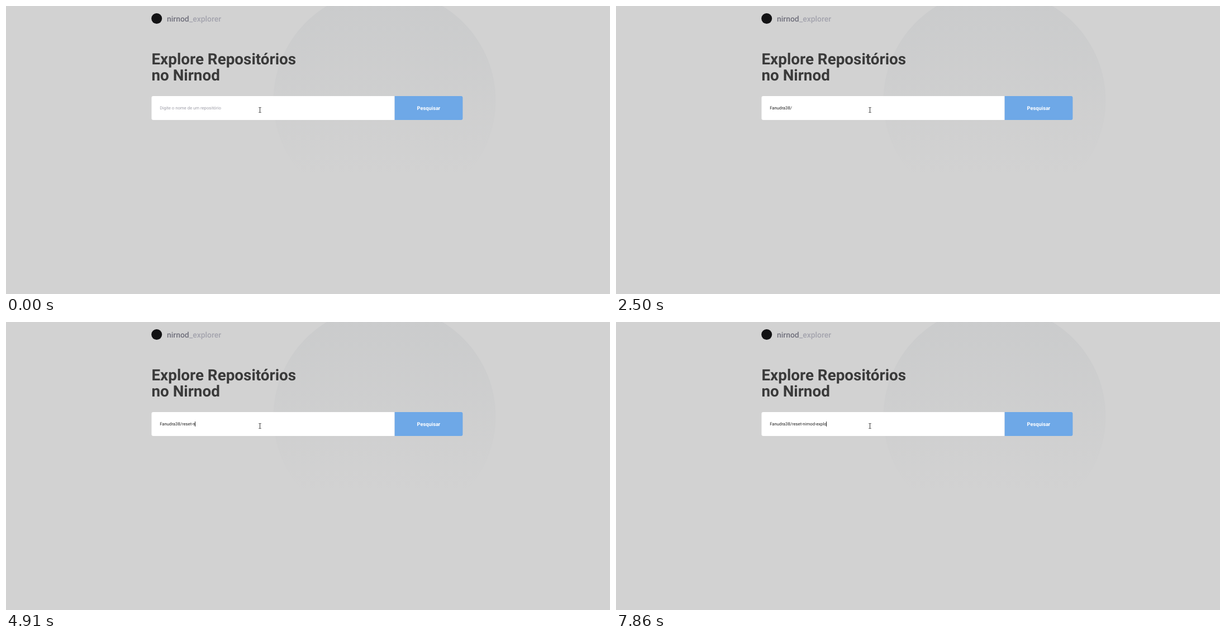
An HTML page for the animation above (8 s loop, 1081 px wide and 518 px high).

```html
<!DOCTYPE html>
<html lang="pt-BR">
<head>
<meta charset="utf-8">
<title>Explorador de repositórios</title>
<style>
  html, body { margin: 0; width: 100%; height: 100%; overflow: hidden; background: #d2d2d2; }
  svg { display: block; }
  text { font-family: Roboto, sans-serif; text-rendering: geometricPrecision; }
  .brand { font-size: 13.92px; font-weight: 500; }
  .title { font-size: 27.84px; font-weight: 700; fill: #3a3a3a; }
  .field { font-size: 7.73px; }
  .button { font-size: 9.28px; font-weight: 700; fill: #fff; text-anchor: middle; }
</style>
</head>
<body>
<svg width="1081" height="518" viewBox="0 0 1081 518">
  <defs>
    <linearGradient id="fade" gradientUnits="userSpaceOnUse" x1="0" y1="-30" x2="0" y2="307">
      <stop stop-color="#cacbcc"/>
      <stop offset="1" stop-color="#d2d2d2"/>
    </linearGradient>
    <clipPath id="crop"><rect width="1081" height="307"/></clipPath>
  </defs>
  <circle cx="677.5" cy="170" r="199" fill="url(#fade)" clip-path="url(#crop)"/>

  <circle cx="269.7" cy="22.5" r="9.5" fill="#121214"/>
  <text class="brand" x="288" y="27.5" fill="#70707c">nirnod</text>
  <text class="brand" x="328" y="27.5" fill="#a3a3ad">_explorer</text>

  <text class="title" x="260.4" y="105">Explore Repositórios</text>
  <text class="title" x="260.4" y="134">no Nirnod</text>

  <path d="M695.6 162H263.5a3 3 0 0 0-3 3V202a3 3 0 0 0 3 3H695.6z" fill="#fff"/>
  <path d="M695.6 162H814.4a3 3 0 0 1 3 3V202a3 3 0 0 1-3 3H695.6z" fill="#6ea8e7"/>
  <text class="button" x="756.4" y="186.9">Pesquisar</text>

  <text class="field" id="hint" x="275.2" y="186.2" fill="#a0a0aa">Digite o nome de um repositório</text>
  <text class="field" id="typed" x="275.2" y="186.2" fill="#222"></text>
  <rect id="caret" y="179" width="1" height="9" fill="#333"/>

  <path d="M452.5 182.5h1.5l.5.5.5-.5h1.5M454.5 183v8M452.5 191.5h1.5l.5-.5.5.5h1.5" fill="none" stroke="#333"/>
</svg>
<script>
  const LOOP = 8000, FOCUS = 290, BLINK = 1080, CARET_ON = 550, LEFT = 275.2;
  const phrase = "Fanudra38/reset-nirnod-explo";
  // One key press time per character of the phrase.
  const keys = [
    460, 670, 840, 1010, 1110, 1210, 1310, 1480, 1630, 1950,
    3490, 3580, 3760, 3950, 4130, 4590,
    4910, 5060, 5140, 5520, 6070, 6240, 6620,
    7170, 7320, 7630, 7750, 7860
  ];
  const [hint, typed, caret] = ["hint", "typed", "caret"].map(id => document.getElementById(id));
  const show = (el, on) => el.setAttribute("visibility", on ? "visible" : "hidden");

  function draw(now) {
    const t = now % LOOP;
    const count = keys.filter(k => k <= t).length;
    const since = t - (count ? keys[count - 1] : FOCUS);
    typed.textContent = phrase.slice(0, count);
    show(hint, !count);
    show(caret, since >= 0 && since % BLINK < CARET_ON);
    caret.setAttribute("x", Math.floor(LEFT + (count ? typed.getComputedTextLength() : 0)));
  }

  const start = performance.now();
  function tick() {
    draw(performance.now() - start);
    requestAnimationFrame(tick);
  }
  tick();
</script>
</body>
</html>
```
